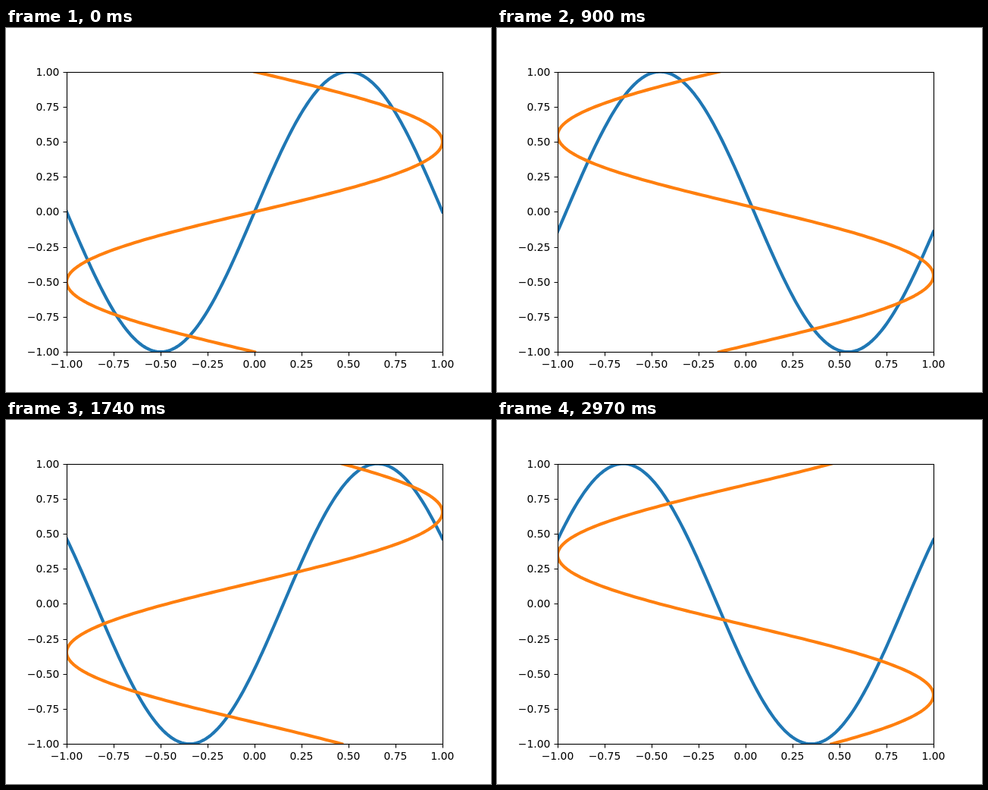
An HTML page that plays this animation: 640x480 px, repeating every 3000 ms.

```html
<!DOCTYPE html>
<html lang="en">
<head>
<meta charset="utf-8">
<title>Travelling sine waves</title>
<style>
  html, body { margin: 0; width: 640px; height: 480px; overflow: hidden; background: #fff; }
  svg { display: block; }
  text { font: 13.889px "DejaVu Sans", sans-serif; }
  .wave { fill: none; stroke-width: 4.167; stroke-linecap: square; stroke-linejoin: round; }
  .axis { fill: none; stroke: #000; stroke-width: 1.111; }
</style>
</head>
<body>
<svg width="640" height="480" viewBox="0 0 640 480">
  <clipPath id="plot"><rect x="80" y="58" width="496" height="369"/></clipPath>
  <g clip-path="url(#plot)">
    <path id="blue" class="wave" stroke="#1f77b4"/>
    <path id="orange" class="wave" stroke="#ff7f0e"/>
  </g>
  <path id="ticks" class="axis"/>
  <rect class="axis" x="80.5" y="58.5" width="496" height="369"/>
  <g id="labels"></g>
</svg>
<script>
const $ = id => document.getElementById(id);
const STEP_MS = 30, STEPS = 100, SAMPLES = 200;
const px = x => 328 + 248 * x;
const py = y => 242.4 - 184.8 * y;

let ticks = '', labels = '';
for (let v = -1; v <= 1; v += 0.25) {
  const x = Math.round(px(v)), y = Math.round(py(v));
  const label = v.toFixed(2).replace('-', '\u2212');
  ticks += `M${x + 0.5} 427.5v5M80.5 ${y + 0.5}h-5`;
  labels += `<text x="${x}" y="448" text-anchor="middle">${label}</text>` +
            `<text x="70.3" y="${y + 5}" text-anchor="end">${label}</text>`;
}
$('ticks').setAttribute('d', ticks);
$('labels').innerHTML = labels;

function draw(now) {
  const phase = 0.1 * (Math.floor(now / STEP_MS) % STEPS);
  const blue = [], orange = [];
  for (let i = 0; i <= SAMPLES; i++) {
    const u = 2 * i / SAMPLES - 1;
    const s = Math.sin(Math.PI * u + phase);
    blue.push(px(u).toFixed(2) + ' ' + py(s).toFixed(2));
    orange.push(px(s).toFixed(2) + ' ' + py(u).toFixed(2));
  }
  $('blue').setAttribute('d', 'M' + blue.join('L'));
  $('orange').setAttribute('d', 'M' + orange.join('L'));
}

function tick() {
  draw(performance.now());
  requestAnimationFrame(tick);
}
tick();
</script>
</body>
</html>
```
